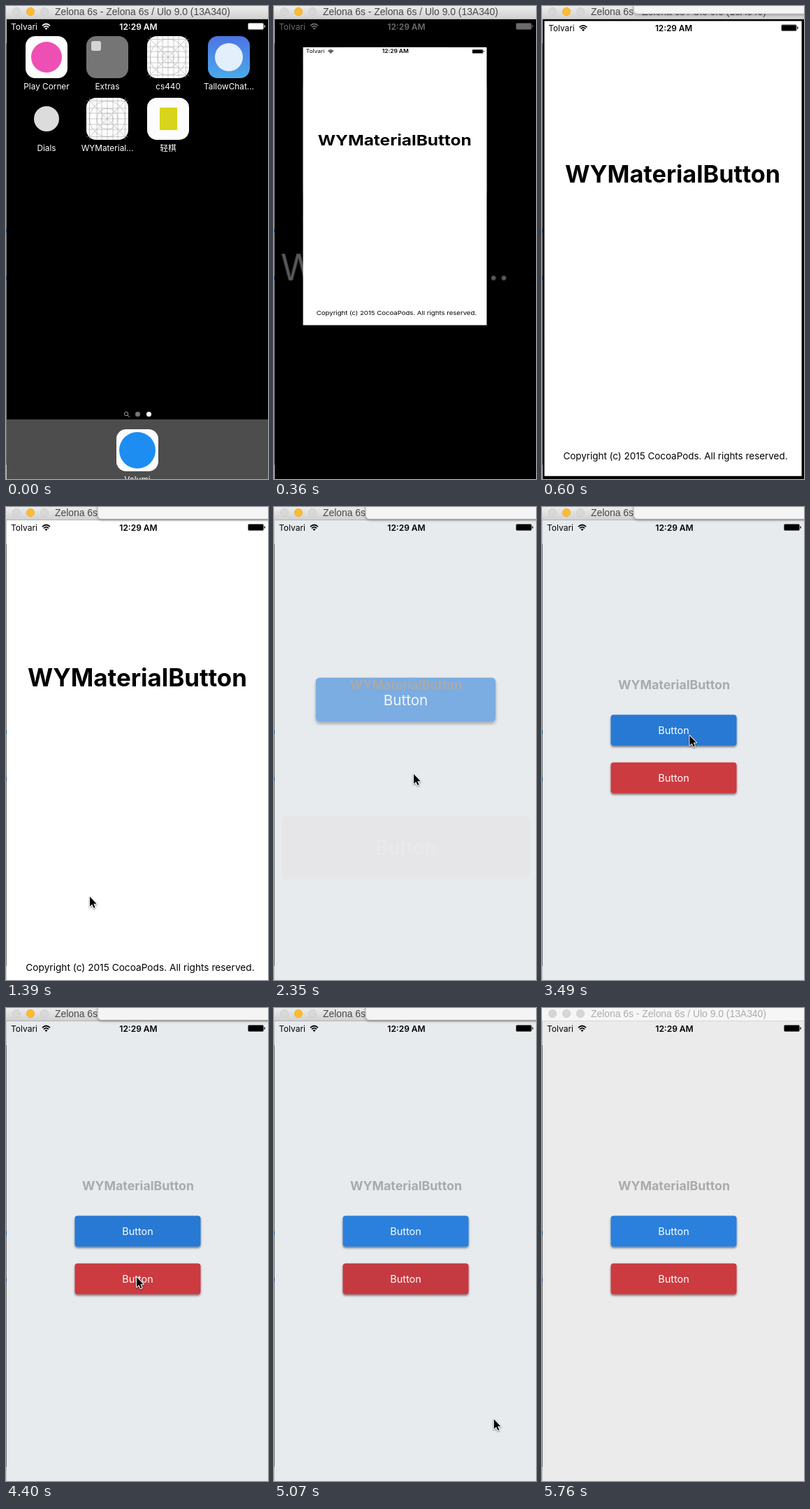
An HTML page that plays this animation: 375x675 px, repeating every 5.86 s.

```html
<!DOCTYPE html>
<html lang="en">
<head>
<meta charset="utf-8">
<title>WYMaterialButton</title>
<style>
html, body { margin: 0; width: 100%; height: 100%; overflow: hidden; background: #000; }
svg { display: block; width: 375px; height: 675px; font-family: Inter, "Noto Sans CJK SC", "Noto Sans CJK", sans-serif; }
.mid { text-anchor: middle; }
.label { font-size: 11.8px; fill: #fff; text-anchor: middle; }
.bold { font-weight: 700; text-anchor: middle; }
</style>
</head>
<body>
<svg viewBox="0 0 375 675" xmlns="http://www.w3.org/2000/svg">
  <defs>
    <linearGradient id="chrome" x2="0" y2="1">
      <stop stop-color="#ececec"/><stop offset="1" stop-color="#d0d0d0"/>
    </linearGradient>
    <linearGradient id="sky" x2="0" y2="1">
      <stop stop-color="#4d74e4"/><stop offset="1" stop-color="#4aa9ea"/>
    </linearGradient>
    <filter id="lift" x="-10%" y="-20%" width="120%" height="150%">
      <feDropShadow dx="0" dy="2" stdDeviation="1.5" flood-opacity=".5"/>
    </filter>
    <filter id="soft" x="-10%" y="-50%" width="120%" height="220%">
      <feDropShadow dx="0" dy="1" stdDeviation="2" flood-opacity=".45"/>
    </filter>
    <clipPath id="stage"><rect x="1" y="19" width="374" height="656"/></clipPath>
    <clipPath id="pill"><rect x="-90" y="-22" width="180" height="44" rx="4"/></clipPath>
    <g id="status">
      <text x="7" y="33.5" font-size="12">Tolvari</text>
      <text x="189.5" y="33.5" font-size="12" font-weight="600" class="mid">12:29 AM</text>
      <g fill="none" stroke="currentColor" stroke-width="1.7">
        <path d="M52 28.2Q57.5 22.8 63 28.2M54 30.4Q57.5 27 61 30.4"/>
      </g>
      <path d="M55.4 31.8Q57.5 30 59.6 31.8L57.5 34Z"/>
      <rect x="346.5" y="24.5" width="22" height="9" rx="1.5" fill="none" stroke="currentColor" stroke-opacity=".55"/>
      <rect x="347" y="25" width="21" height="8" rx=".8"/>
      <path d="M369.5 27V31Q371 30.5 371 29T369.5 27Z"/>
    </g>
    <g id="blank">
      <rect width="60" height="60" rx="14" fill="#fcfcfc"/>
      <g fill="none" stroke="#9c9c9c" stroke-width=".5">
        <path d="M4 4L56 56M56 4L4 56M4.5 0V60M15 0V60M22 0V60M30 0V60M38 0V60M45 0V60M55.5 0V60M0 4.5H60M0 15H60M0 22H60M0 30H60M0 38H60M0 45H60M0 55.5H60"/>
        <circle cx="30" cy="30" r="8"/><circle cx="30" cy="30" r="15"/><circle cx="30" cy="30" r="25.5"/>
      </g>
    </g>
  </defs>

  <rect width="375" height="675" fill="#000"/>
  <g clip-path="url(#stage)">
    <g id="home"></g>
    <use id="homeBar" href="#status" fill="#fff" color="#fff"/>
    <g id="card">
      <rect width="375" height="667" fill="#fff"/>
      <g transform="translate(-1 -19)">
        <use href="#status"/>
        <text x="188" y="255.5" class="bold" font-size="34.9">WYMaterialButton</text>
        <text x="192" y="661.5" class="mid" font-size="13.7">Copyright (c) 2015 CocoaPods. All rights reserved.</text>
      </g>
    </g>
    <g id="app">
      <rect id="page" x="1" y="19" width="374" height="656"/>
      <g id="blue"></g>
      <g id="red"></g>
      <text x="189" y="260" class="bold" font-size="17.8" fill="#aaa">WYMaterialButton</text>
    </g>
    <use id="appBar" href="#status"/>
  </g>

  <path d="M.5 19V675" stroke="#c4c4c4"/>
  <path d="M.5 53V655" stroke="#777"/>
  <path d="M0 318A1 3 0 0 1 0 324ZM0 385A1 3 0 0 1 0 391Z" fill="#0b4a86"/>

  <g>
    <rect id="top" width="375" height="19"/>
    <path id="rule" d="M0 18.5H375"/>
    <circle class="dot" cx="15" cy="8" r="5.7"/>
    <circle class="dot" cx="35" cy="8" r="5.7"/>
    <circle class="dot" cx="55" cy="8" r="5.7"/>
    <text id="caption" x="70" y="13" font-size="13.9" font-family="Liberation Sans, Arial, sans-serif">Zelona 6s - Zelona 6s / Ulo 9.0 (13A340)</text>
  </g>
  <rect id="panel" x="131.5" y="-20" width="260" height="37" rx="5" fill="#f4f4f4" stroke="#b5b5b5" stroke-width=".5" filter="url(#soft)"/>
  <g id="cursor">
    <path d="M1 1V15L4.2 12 6.6 17 8.6 16.2 6.3 11.2H10.6Z" stroke="#fff" stroke-width="2" stroke-linejoin="round" paint-order="stroke" filter="drop-shadow(0 1px 1px rgba(0,0,0,.45))"/>
  </g>
</svg>
<script>
const LOOP = 5860;
const $ = id => document.getElementById(id);
const set = (el, attrs) => { for (const k in attrs) el.setAttribute(k, attrs[k]); };
const clamp = v => Math.max(0, Math.min(1, v));
const span = (t, a, b) => clamp((t - a) / (b - a));
const ease = u => u * u * (3 - 2 * u);
const mix = (a, b, u) => a + (b - a) * u;
const show = (el, on) => el.setAttribute('visibility', on ? 'visible' : 'hidden');

const tile = fill => `<rect width="60" height="60" rx="14" fill="${fill}"/>`;
const disc = (fill, r) => `<circle cx="30" cy="30" r="${r}" fill="${fill}"/>`;
const blank = '<use href="#blank"/>';

function icon(x, y, art, name) {
  return `<g transform="translate(${x} ${y})">${art}<text class="label" x="30" y="76">${name}</text></g>`;
}

$('home').innerHTML =
  '<rect y="590" width="376" height="97" fill="#4d4d4d"/>' +
  icon(28, 43, tile('#fcfcfc') + disc('#ee4fb4', 22), 'Play Corner') +
  icon(115, 43, tile('#757575') + '<rect x="7" y="7" width="14" height="14" rx="3" fill="#d8d4d0"/>', 'Extras') +
  icon(202, 43, blank, 'cs440') +
  icon(289, 43, tile('url(#sky)') + disc('#e4effc', 20), 'TallowChat...') +
  icon(28, 131, disc('#dcdcdc', 18), 'Dials') +
  icon(115, 131, blank, 'WYMaterial...') +
  icon(202, 131, tile('#fcfcfc') + '<rect x="18" y="14" width="25" height="32" fill="#d8d41c"/>', '轻棋') +
  icon(158, 604, tile('#fcfcfc') + disc('#1d8df2', 26), 'Velumi') +
  '<g fill="none" stroke="#999"><circle cx="172" cy="582" r="2.7"/><path d="M174 584L177 587"/></g>' +
  '<circle cx="188.5" cy="582.5" r="3.5" fill="#777"/><circle cx="204.5" cy="582.5" r="3.5" fill="#fff"/>';

function makeButton(id, fill) {
  $(id).innerHTML =
    `<rect x="-90" y="-22" width="180" height="44" rx="4" fill="${fill}" filter="url(#lift)"/>` +
    '<g clip-path="url(#pill)"><circle class="ripple" fill="#00205c"/></g>' +
    '<text class="mid" y="5.5" font-size="14.4" fill="#fff">Button</text>';
}
makeButton('blue', '#2b80dc');
makeButton('red', '#cb3b40');

// Underdamped step response, about 4% overshoot
function spring(ms) {
  if (ms <= 0) return 0;
  const z = 0.724, w = 0.013 * ms, d = Math.sqrt(1 - z * z);
  return 1 - Math.exp(-z * w) * (Math.cos(d * w) + z / d * Math.sin(d * w));
}

function drawButton(id, t, start, y, shift, ripple) {
  const p = t > 2990 ? 1 : spring(t - start);
  const g = $(id);
  show(g, t >= 2350);
  set(g, {
    transform: `translate(188.5 ${y + shift * (1 - p)}) scale(${2 - p})`,
    opacity: clamp(p)
  });
  set(g.querySelector('.ripple'), ripple);
}

function ripple(t, a, b, fade, x, y) {
  return { cx: x, cy: y, r: 150 * ease(span(t, a, b)), opacity: 0.07 * (1 - span(t, fade, fade + 400)) };
}

// time, x, y of the pointer tip
const trail = [
  [890, -10, 590], [1190, 119, 555], [1390, 119, 555], [1540, 151, 508],
  [1710, 151, 508], [2200, 199, 380], [2350, 199, 380], [2700, 226, 331],
  [2980, 226, 331], [3540, 210, 325], [3840, 210, 325], [4400, 186, 383],
  [4740, 186, 383], [5240, 360, 659], [5300, 360, 659]
];

function drawCursor(t) {
  const i = trail.findIndex(k => k[0] > t);
  show($('cursor'), i > 0);
  if (i < 1) return;
  const a = trail[i - 1], b = trail[i], u = ease(span(t, a[0], b[0]));
  set($('cursor'), { transform: `translate(${mix(a[1], b[1], u)} ${mix(a[2], b[2], u)})` });
}

function drawLaunch(t) {
  const p = 1 - Math.pow(1 - span(t, 180, 720), 2.53);
  const x = mix(115, 1, p), y = mix(131, 19, p), w = mix(60, 375, p);
  const h = mix(60, 667, Math.pow(p, 1.34));
  const k = w / 60;
  set($('home'), { transform: `translate(${x - 115 * k} ${y - 131 * k}) scale(${k})`, opacity: 1 - p });
  set($('homeBar'), { opacity: 1 - 0.9 * p });
  set($('card'), { transform: `translate(${x} ${y}) scale(${w / 375} ${h / 667})`, opacity: clamp(p * 2.5) });
}

function drawChrome(t, idle) {
  set($('top'), { fill: idle ? '#f6f6f6' : 'url(#chrome)' });
  set($('rule'), { stroke: idle ? '#d6d6d6' : '#b4b4b4' });
  set($('caption'), { fill: idle ? '#acacac' : '#484848' });
  document.querySelectorAll('.dot').forEach((d, i) => {
    const lit = i === 1 && !idle;
    set(d, { fill: lit ? '#fdbc2e' : idle ? '#d6d6d6' : '#d8d8d8', stroke: lit ? '#e0a02a' : '#c6c6c6', 'stroke-width': 0.6 });
  });
  const drop = ease(span(t, 480, 660));
  show($('panel'), t > 480 && t < 5240);
  set($('panel'), { transform: `translate(0 ${-24 * (1 - drop)})`, opacity: 1 - span(t, 5100, 5240) });
}

function draw(t) {
  const idle = t >= 5760;
  drawLaunch(t);
  set($('app'), { opacity: ease(span(t, 1680, 2200)) });
  set($('page'), { fill: idle ? '#ebebeb' : '#e7ebee' });
  show($('appBar'), t >= 1680);
  drawButton('blue', t, 2227, 318.5, -101, ripple(t, 2980, 3540, 4680, 38, 12));
  drawButton('red', t, 2332, 386.5, 101, ripple(t, 4620, 5000, 4860, -2, -3));
  drawChrome(t, idle);
  drawCursor(t);
}

const start = performance.now();
function tick() {
  draw((performance.now() - start) % LOOP);
  requestAnimationFrame(tick);
}
tick();
</script>
</body>
</html>
```
